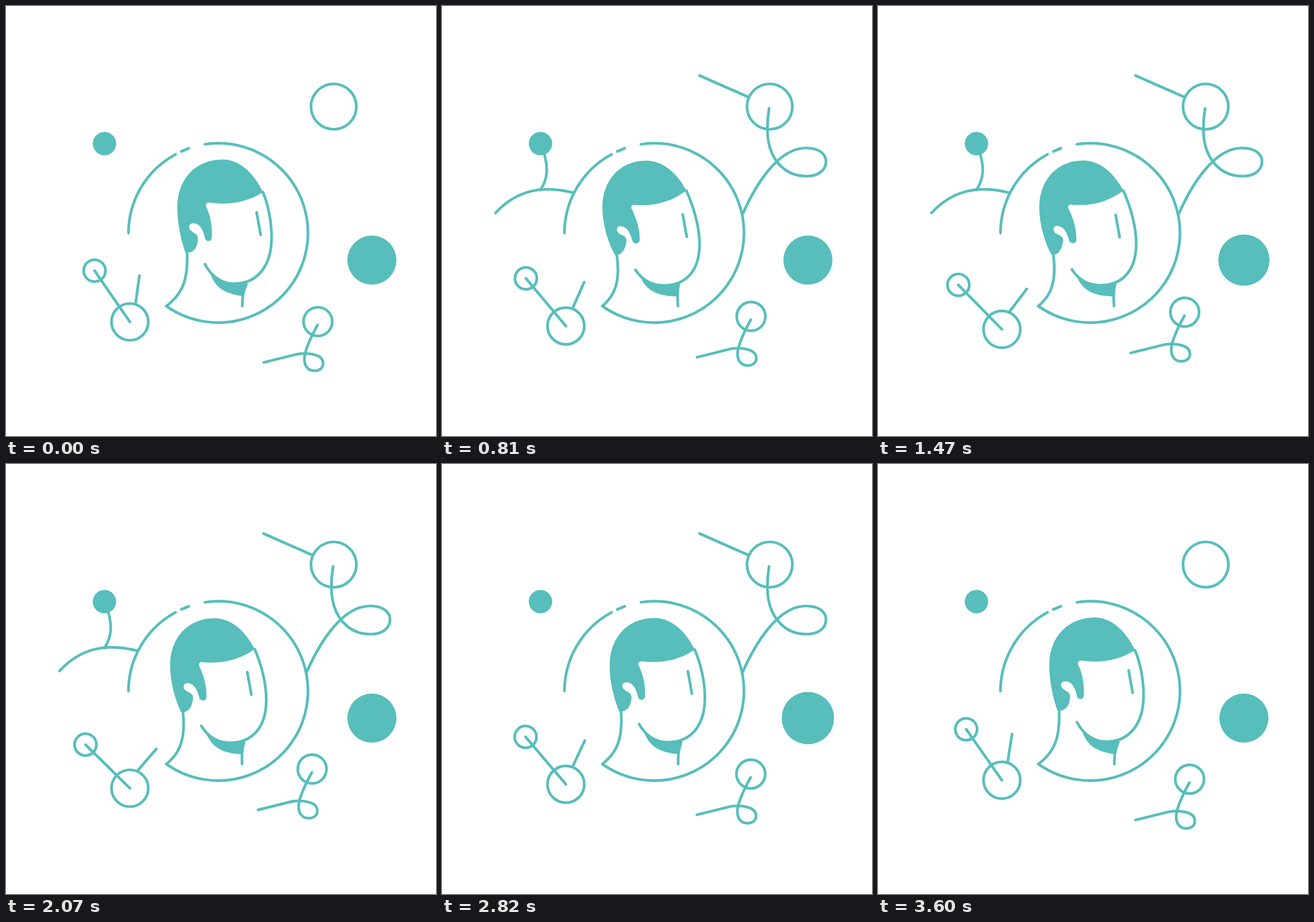
An HTML page that plays this animation: 748 px wide and 748 px high, repeating every 3.63 s.

```html
<!DOCTYPE html>
<html lang="en">
<head>
<meta charset="utf-8">
<title>Portrait line art</title>
<style>
  html, body { margin: 0; width: 100%; height: 100%; overflow: hidden; background: #fff; }
  svg { display: block; width: 100vw; height: 100vh; }
  .line { fill: none; stroke: #57bebc; stroke-width: 4.7; stroke-linecap: round; stroke-linejoin: round; }
  .solid { fill: #57bebc; }
</style>
</head>
<body>
<svg viewBox="0 0 748 748">
  <g class="line">
    <path d="M213 395A156 156 0 0 1 295 258M305 253L318 247.5M346 240.5A156 156 0 1 1 279 522"/>
    <circle cx="570" cy="175" r="39.5"/>
    <path id="branch" pathLength="1" d="M229 325C175 311 130 320 93 360"/>
    <path id="stem" pathLength="1" d="M171 320C185 300 184 280 178 258"/>
    <path id="tendril" pathLength="1" d="M523 362C545 312 585 246 634 247C656 247 668 258 668 270C668 288 652 296 634 296C595 296 566 265 566 214C566 203 567 190 569 178"/>
    <path id="twig" pathLength="1" d="M532 158L448 121"/>
    <path id="face"/>
    <path id="nape"/>
    <path id="throat"/>
    <path id="eye" d="M436 359L443 398"/>
    <g id="curl">
      <circle cx="542.5" cy="549" r="25"/>
      <path d="M448.5 620L505 606C520 602.5 551 604 551.5 621C552 630 545 634.5 536.5 634.5C526 634.5 519 627 519 614C519 602 530 577 542 555"/>
    </g>
    <g id="joint">
      <circle r="32"/>
      <g id="arm"><path d="M0 0V-108.2"/><circle cy="-108.2" r="19"/></g>
      <path id="rod" d="M0 0V-48.4"/>
    </g>
  </g>
  <g class="solid">
    <circle cx="171.3" cy="239.3" r="20.4"/>
    <circle id="dot" cx="636.5" cy="442" r="42.7"/>
    <path id="hair"/>
    <path id="shadow"/>
  </g>
</svg>
<script>
const LOOP = 3630, TICK = 30;
const $ = id => document.getElementById(id);
const clamp = v => Math.min(1, Math.max(0, v));
const lerp = (a, b, k) => a + (b - a) * k;
const ramp = (t, a, b) => clamp((t - a) / (b - a));
const upDown = (t, peak, end) => Math.min(t / peak, (end - t) / (end - peak));
const inOut = (t, a, b, c, d) => ramp(t, a, b) - ramp(t, c, d);
const bump = (t, mid, half) =>
  Math.abs(t - mid) < half ? (1 + Math.cos(Math.PI * (t - mid) / half)) / 2 : 0;

// Each part: head upright, head leaning back
const poses = {
  hair: [
    'M447 324C432 291 406 267 377 267C331 267 298 300 298 350C298 380 305 408 312 429C326 431 334 420 334 404C334 397 328 396 322 391C316 386 318 378 326 378C337 378 343 389 346 403C347 411 358 411 358 402C359 384 356 364 348 349C347 344 350 341 355 342C388 347 420 341 447 324Z',
    'M425 321C408 289 383 269 355 269C309 269 279 304 279 350C279 380 290 415 301 433C312 435 320 423 321 407C320 400 314 399 308 396C302 391 303 383 311 383C322 384 328 395 331 408C333 415 344 415 344 406C344 386 338 369 330 353C328 348 331 345 336 346C370 349 400 340 425 321Z'],
  face: [
    'M447 324C456 345 462 375 462 402C462 455 435 483 397 483C375 483 357 470 346 449',
    'M425 321C438 350 448 385 448 414C448 460 425 486 386 486C366 486 349 478 336.5 459'],
  shadow: [
    'M355 464C364 493 385 501 413 505L419 481C404 486 375 487 355 464Z',
    'M346 474C358 498 380 505 409 505L412 481C395 489 368 490 346 474Z'],
  nape: [
    'M315 428C317 475 308 500 279 522',
    'M304 432C310 475 303 502 279 522'],
  throat: [
    'M418 484C415 492 411 500 411 522',
    'M412 484C409 495 409 505 410.5 522']
};
const numbers = /[\d.]+/g;

function morph(id, k) {
  const [a, b] = poses[id], to = b.match(numbers);
  let i = 0;
  $(id).setAttribute('d', a.replace(numbers, n => lerp(+n, +to[i++], k).toFixed(2)));
}

function trim(id, p) {
  p = clamp(p);
  $(id).style.visibility = p > 0 ? 'visible' : 'hidden';
  $(id).setAttribute('stroke-dasharray', p < 1 ? p + ' 2' : 'none');
}

const move = (id, x, y, turn = 0) =>
  $(id).setAttribute('transform', `translate(${x} ${y}) rotate(${turn})`);

const tendrilLen = $('tendril').getTotalLength();
const twigLen = $('twig').getTotalLength();

function draw(ms) {
  const t = ms % LOOP / TICK;

  const lean = t < 40 ? 1 - (1 - t / 40) ** 3 : Math.max(0, (120 - t) / 80);
  for (const id in poses) morph(id, lean * 1.035);
  const look = Math.max(0, upDown(t, 40, 120));
  move('eye', -25.5 * look, 5 * look);

  const sway = upDown(t, 62, 122);
  move('curl', -11.3 * sway, -20.8 * sway);
  move('joint', 215.5, 549.5 + 16.4 * sway);
  move('arm', 0, 0, -34.6 - 12.4 * sway);
  move('rod', 10 + 5 * sway, -32.5 + sway, 7.7 + 37.3 * sway);

  const left = inOut(t, 4, 12, 77, 89);
  trim('branch', left);
  trim('stem', left);
  const drawn = inOut(t, 4, 20, 98, 114) * (tendrilLen + twigLen);
  trim('tendril', drawn / tendrilLen);
  trim('twig', (drawn - tendrilLen) / twigLen);

  const pulse = 4.4 * (bump(t, 13, 4.5) + bump(t, 51.5, 4.5)) + 4.1 * bump(t, 91, 8);
  $('dot').setAttribute('r', 42.7 + pulse);
}

function loop(now) {
  draw(now);
  requestAnimationFrame(loop);
}
draw(0);
requestAnimationFrame(loop);
</script>
</body>
</html>
```
